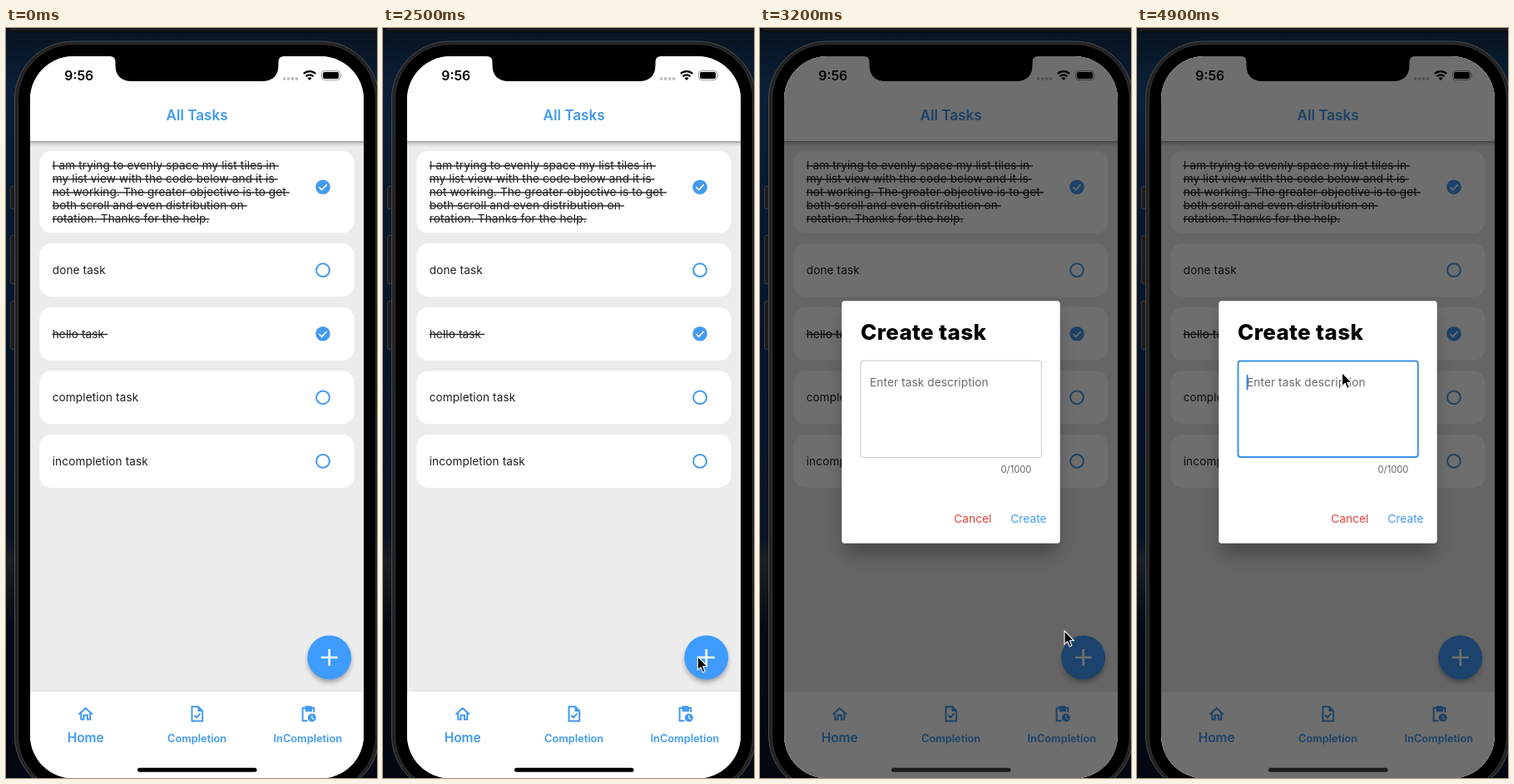
An HTML page that plays this animation: 446x902 px, repeating every 5 s.

```html
<!DOCTYPE html>
<html lang="en">
<head>
<meta charset="utf-8">
<title>All Tasks</title>
<style>
  html, body { margin: 0; width: 100%; height: 100%; overflow: hidden; background: #000; }
  svg { display: block; width: 446px; height: 902px; }
  text { font-family: Inter, "Open Sans", sans-serif; white-space: pre; }
  .body { font-size: 13.6px; letter-spacing: .12px; fill: #1f1f1f; }
  .done { text-decoration: line-through; }
  .mid { text-anchor: middle; font-weight: 600; fill: #429aef; }
  .line { fill: none; stroke: #429aef; stroke-width: 2; }
</style>
</head>
<body>
<svg viewBox="0 0 446 902" xmlns="http://www.w3.org/2000/svg">
  <defs>
    <linearGradient id="wall" x2="0" y2="1">
      <stop offset="0" stop-color="#07121f"/>
      <stop offset=".08" stop-color="#0b2038"/>
      <stop offset=".2" stop-color="#081a30"/>
      <stop offset=".45" stop-color="#06142a"/>
      <stop offset=".68" stop-color="#0a1424"/>
      <stop offset=".71" stop-color="#1b1f25"/>
      <stop offset=".77" stop-color="#0c1118"/>
      <stop offset=".8" stop-color="#030a16"/>
      <stop offset="1" stop-color="#020712"/>
    </linearGradient>
    <linearGradient id="under" x2="0" y2="1">
      <stop offset="0" stop-opacity=".36"/>
      <stop offset=".4" stop-opacity=".12"/>
      <stop offset="1" stop-opacity="0"/>
    </linearGradient>
    <filter id="soft" x="-40%" y="-40%" width="180%" height="180%">
      <feGaussianBlur stdDeviation="3"/>
    </filter>
    <filter id="wide" x="-30%" y="-30%" width="160%" height="160%">
      <feGaussianBlur stdDeviation="11"/>
    </filter>
    <clipPath id="screen"><rect x="29" y="34" width="401" height="868.5" rx="52"/></clipPath>
  </defs>

  <rect width="446" height="902" fill="url(#wall)"/>
  <rect x="4" width="442" height="4" fill="#1b1c1e"/>
  <path d="M4 4.5H446" stroke="#050505"/>
  <g fill="#1b1b1c" stroke="#3a3a3b">
    <rect x="5.5" y="190.5" width="8" height="27" rx="1.5"/>
    <rect x="5.5" y="249.5" width="8" height="58" rx="1.5"/>
    <rect x="5.5" y="328.5" width="8" height="58" rx="1.5"/>
  </g>
  <rect x="10.5" y="16" width="438" height="905" rx="70" fill="#222223" stroke="#4c4c4d"/>
  <rect x="14.5" y="19.5" width="430" height="898" rx="66" fill="#000" stroke="#343435"/>

  <g clip-path="url(#screen)">
    <rect x="29" y="34" width="401" height="869" fill="#ececec"/>
    <rect x="29" y="34" width="401" height="102" fill="#fff"/>
    <rect x="29" y="136" width="401" height="7" fill="url(#under)"/>
    <text class="mid" x="229.5" y="111" font-size="17.1">All Tasks</text>
    <g id="cards"></g>

    <rect x="29" y="798" width="401" height="105" fill="#fff"/>
    <path d="M29 797.5H430" stroke="#e4e4e4"/>
    <circle cx="388.7" cy="761" r="25.5" opacity=".36" filter="url(#soft)"/>
    <circle cx="388.7" cy="757" r="26.4" fill="#3f9bfd"/>
    <path d="M378.7 757H398.7M388.7 747V767" stroke="#fff" stroke-width="2.7"/>

    <g class="line">
      <path d="M87.5 825.5L95.7 818L104 825.5M90.3 823.5V831.6H93.6V826.4H97.9V831.6H101.2V823.5"/>
      <path d="M223.5 816.3H231.2L236.2 821.3V833.5H223.5ZM226.4 826.6L229 829.2L233.5 824.4"/>
      <path d="M362.5 833.2H356.6V817.7H370.2V823M360 821.2H367V817.5"/>
    </g>
    <path d="M230.5 816.5V822H236Z" fill="#429aef"/>
    <rect x="359.5" y="815.3" width="8" height="5.6" rx="1" fill="#429aef"/>
    <circle cx="367.8" cy="829.5" r="5" fill="#429aef"/>
    <path d="M367.8 826.5V829.7L370 831.6" fill="none" stroke="#fff" stroke-width="1.1"/>
    <text class="mid" x="95.7" y="858.7" font-size="15.5">Home</text>
    <text class="mid" x="229.6" y="859.4" font-size="12.8">Completion</text>
    <text class="mid" x="362.8" y="859.4" font-size="12.8">InCompletion</text>

    <rect id="shade" x="29" y="34" width="401" height="869"/>
    <rect x="158" y="889.7" width="143.5" height="5" rx="2.5" id="bar"/>

    <text x="70.3" y="62.7" font-size="15.8" font-weight="600">9:56</text>
    <g fill-opacity=".25" id="dots"></g>
    <path d="M357.8 55A10.4 10.4 0 0 1 372.2 55M360.5 58.2A6.5 6.5 0 0 1 369.5 58.2"
          fill="none" stroke="#000" stroke-width="2.1"/>
    <path d="M362.4 60.3Q365 58.3 367.6 60.3L365 63Z"/>
    <rect x="379.5" y="51.6" width="22" height="10.8" rx="3.2" fill="none" stroke="#000" stroke-opacity=".42"/>
    <rect x="381" y="53.1" width="19" height="7.8" rx="1.9"/>
    <path d="M402.9 55.2Q404.6 57 402.9 58.8Z" opacity=".45"/>

    <g id="dialog">
      <rect x="102" y="344" width="255" height="288" opacity=".31" filter="url(#wide)"/>
      <rect x="98.3" y="328.3" width="262.4" height="291.5" rx="3.5" fill="#fff"/>
      <text x="121" y="375.2" font-size="26" font-weight="800" letter-spacing=".35">Create task</text>
      <rect fill="none" id="field"/>
      <text class="body" x="132" y="430.7" style="fill:#6a6a6a">Enter task description</text>
      <rect x="131.6" y="417" width="2" height="18.5" rx="1" fill="#2f86da" id="caret"/>
      <text x="326.4" y="534.8" font-size="11.2" fill="#666" text-anchor="end">0/1000</text>
      <text class="body" x="233.2" y="595.4" style="fill:#e2443c">Cancel</text>
      <text class="body" x="301.2" y="595.4" style="fill:#429aef">Create</text>
    </g>
  </g>
  <path d="M122 33H337V34H334Q327.5 34 327.5 41V44Q327.5 64 307.5 64H151.5Q131.5 64 131.5 44V41Q131.5 34 125 34H122Z"/>

  <path id="cursor" d="M0 0V16.2L3.6 12.8L6.2 18.9L8.9 17.8L6.3 11.8H11.6Z"
        stroke="#fff" stroke-width="1.1" stroke-linejoin="round"/>
</svg>
<script>
const $ = id => document.getElementById(id);
const set = (id, attrs) => {
  for (const k in attrs) $(id).setAttribute(k, attrs[k]);
};
const LOOP = 5000, STEP = 100;

const tasks = [
  { y: 148, h: 98.5, done: true, lines: [
    "I am trying to evenly space my list tiles in ",
    "my list view with the code below and it is ",
    "not working. The greater objective is to get ",
    "both scroll and even distribution on ",
    "rotation. Thanks for the help."] },
  { y: 259.2, h: 64, lines: ["done task"] },
  { y: 335.8, h: 64, done: true, lines: ["hello task "] },
  { y: 412.3, h: 64, lines: ["completion task"] },
  { y: 488.9, h: 64, lines: ["incompletion task"] }
];

function card({ y, h, done, lines }) {
  const mid = y + h / 2;
  const first = mid + 5 - (lines.length - 1) * 8;
  const text = lines.map((s, i) =>
    `<text class="body${done ? " done" : ""}" x="55.7" y="${first + i * 16}">${s}</text>`).join("");
  const cy = lines.length > 1 ? mid - 6 : mid;
  const tick = done
    ? `<circle cx="381" cy="${cy}" r="8.8" fill="#429aef"/>
       <path d="M376.4 ${cy + .2}l3.2 3.2l6-6.2" fill="none" stroke="#fff" stroke-width="1.7"/>`
    : `<circle class="line" cx="381" cy="${cy}" r="7.9"/>`;
  return `<rect x="40.4" y="${y}" width="378" height="${h}" rx="14" fill="#fff"/>${text}${tick}`;
}
$("cards").innerHTML = tasks.map(card).join("");
$("dots").innerHTML = [334.5, 339.5, 344.5, 349.5]
  .map(x => `<circle cx="${x}" cy="61" r="1.9"/>`).join("");

// Rows are [time, values...]; values run straight between rows.
const pointer = [
  [700, 176, 8], [800, 192, 150], [900, 203.8, 266.5], [1400, 203.8, 266.5],
  [1500, 226, 320], [1600, 275, 455], [1700, 332, 620], [1800, 368, 725],
  [1900, 378.3, 756], [3100, 378.3, 756], [3200, 366, 725],
  [3300, 300, 540], [3400, 246.5, 414.5]
];
// Barrier and dialog opacity.
const fade = [[2500, 0, 0], [2600, .08, .2], [2700, .56, .925], [2800, .57, 1]];

function at(rows, t) {
  const n = rows.findIndex(r => r[0] >= t);
  if (n < 0) return rows[rows.length - 1].slice(1);
  if (n === 0) return rows[0].slice(1);
  const a = rows[n - 1], b = rows[n], k = (t - a[0]) / (b[0] - a[0]);
  return a.slice(1).map((v, i) => v + (b[i + 1] - v) * k);
}

const clamp = v => Math.max(0, Math.min(1, v));

// Half a second on, half a second off, with soft edges.
function blink(age) {
  if (age < 0) return 0;
  const p = age % 1000;
  return p < 500 ? (age < 500 ? 1 : clamp(p / 150)) : clamp(1 - (p - 500) / 200);
}

function draw(t) {
  const [dim, alpha] = at(fade, t);
  set("shade", { opacity: dim });
  set("dialog", { opacity: alpha });
  set("bar", { fill: dim > .3 ? "#1c1c1c" : "#000" });

  // The border grows inwards.
  const focus = clamp((t - 3500) / 150), w = 1 + focus;
  set("field", {
    x: 120.5 + w / 2, y: 399.6 + w / 2, width: 218.3 - w, height: 117.4 - w, rx: 4 - w / 2,
    stroke: focus ? "#3a94e6" : "#c8c8c8", "stroke-width": w
  });
  set("caret", { opacity: blink(t - 3600) });

  const [x, y] = at(pointer, t);
  set("cursor", {
    transform: `translate(${x} ${y})`,
    visibility: t < 700 ? "hidden" : "visible"
  });
}

const start = performance.now();
function tick() {
  const t = (performance.now() - start) % LOOP;
  draw(Math.floor(t / STEP) * STEP);
  requestAnimationFrame(tick);
}
draw(0);
requestAnimationFrame(tick);
</script>
</body>
</html>
```
